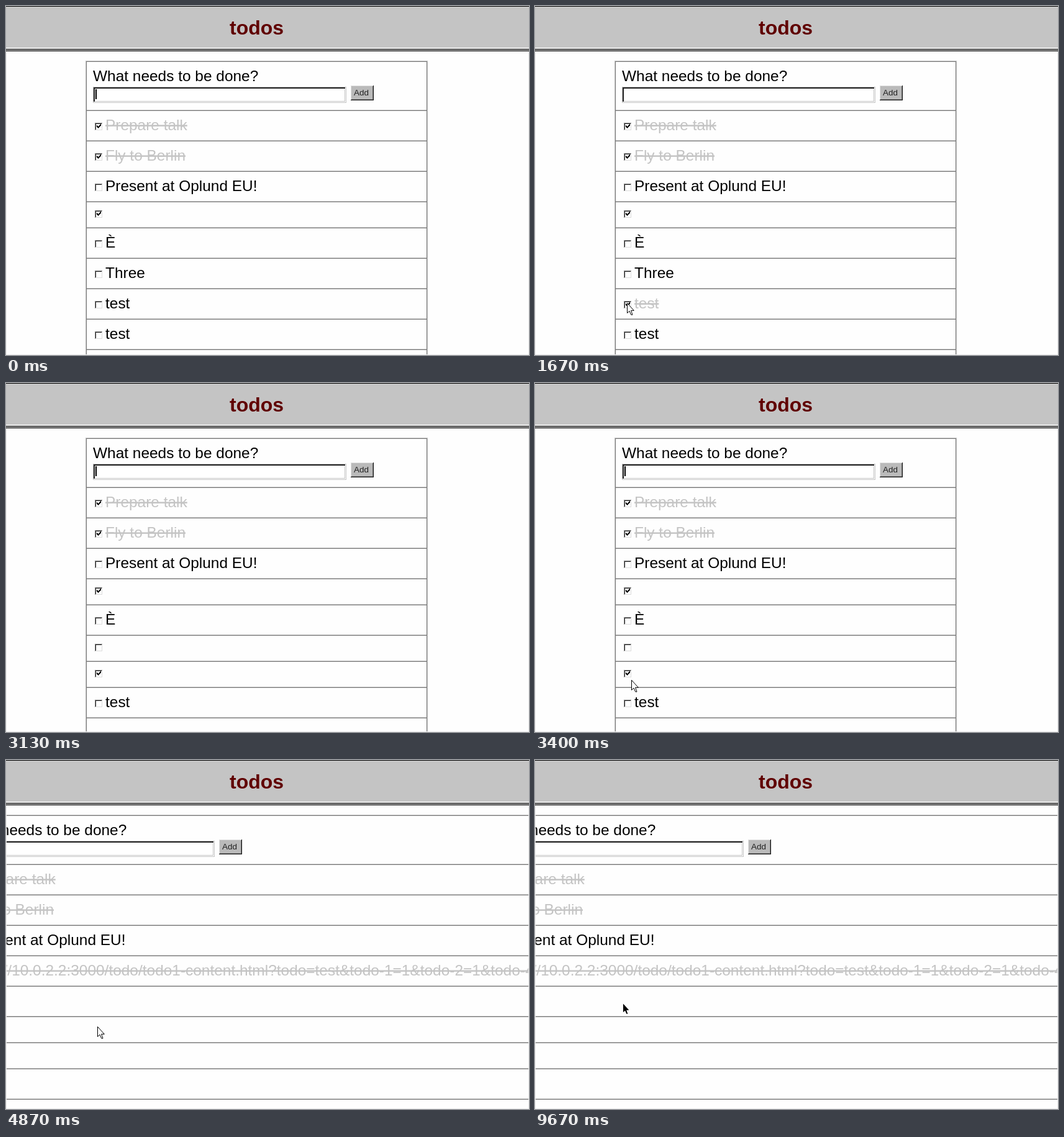
Write an HTML page that moves like this. It is 842 by 562 pixels and loops after 9800 ms.

```html
<!DOCTYPE html>
<html lang="en">
<head>
<meta charset="utf-8">
<title>todos</title>
<style>
html, body { margin: 0; width: 100%; height: 100%; overflow: hidden; background: #fefefe; }
svg { display: block; width: 842px; height: 562px; }
text { font: 24.45px "Liberation Sans", Arial, sans-serif; white-space: pre; }
.done { fill: #c4c4c4; text-decoration: line-through; }
.title { font-size: 32px; font-weight: bold; fill: #600000; }
.button { font-size: 13.5px; fill: #222; }
</style>
</head>
<body>
<svg viewBox="0 0 842 562" shape-rendering="crispEdges">
  <g id="page"></g>
  <g id="frame"></g>
  <g id="pointer"></g>
</svg>
<script>
const TICKS = 147, TICK_RATE = 0.015, SCROLL = 212;
const DARK = '#777', LIGHT = '#c4c4c4';
const $ = id => document.getElementById(id);

const rect = (x, y, w, h, fill) => `<rect x="${x}" y="${y}" width="${w}" height="${h}" fill="${fill}"/>`;
const text = (x, y, s, cls = '') => `<text x="${x}" y="${y}" class="${cls}">${s.replace(/&/g, '&amp;')}</text>`;
const item = (label, checked = false, done = false, height = label ? 49 : 42) => ({ label, checked, done, height });

const head = [
  item('Prepare talk', true, true),
  item('Fly to Berlin', true, true),
  item('Present at Oplund EU!')
];
const url = 'http://10.0.2.2:3000/todo/todo1-content.html?todo=test&todo-1=1&todo-2=1&todo-4=1';
const blank = item(''), ticked = item('', true), accent = item('È'), test = item('test');
const lists = {
  first: [...head, ticked, accent, item('Three'), test, test],
  marked: [...head, ticked, accent, item('Three'), item('test', true, true), test],
  loaded: [...head, ticked, accent, blank, ticked, test],
  cleared: [...head, ticked, accent, blank, blank, test],
  wide: [...head, item(url, true, true), accent, blank, ticked, test]
};

function checkbox(y, checked, pressed) {
  const x = 143;
  return rect(x, y, 12, 12, pressed ? '#b4b4b4' : '#fff') +
    rect(x, y, 12, 1, '#888') + rect(x, y, 1, 12, '#888') +
    rect(x + 1, y + 1, 10, 1, '#222') + rect(x + 1, y + 1, 1, 10, '#222') +
    rect(x + 1, y + 11, 11, 1, '#ddd') + rect(x + 11, y + 1, 1, 11, '#ddd') +
    (checked ? `<path d="M${x + 3} ${y + 4}l2 2 5-4v3l-5 4-2-2z"/>` : '');
}

function form(caret) {
  return rect(140, 130, 408, 26, LIGHT) + rect(141, 131, 406, 24, '#fff') +
    rect(141, 131, 405, 2, '#222') + rect(141, 131, 2, 23, '#222') +
    rect(143, 153, 403, 1, LIGHT) + rect(545, 133, 1, 21, LIGHT) +
    (caret ? rect(144, 134, 2, 16, '#000') : '') +
    rect(555, 128, 37, 24, '#111') + rect(555, 128, 36, 23, '#e4e4e4') +
    rect(556, 129, 35, 22, '#777') + rect(556, 129, 34, 21, '#bababa') +
    text(560, 144, 'Add', 'button');
}

// hidden: half-open range of missing widgets (0 is the form, then the boxes)
function table({ list, count = 9, hidden = [0, 0], caret, pressed, wipe, wide }) {
  const right = wide ? 1500 : 677;
  const shown = n => n < hidden[0] || n >= hidden[1];
  const line = y => rect(130, y - 1, right - 130, 1, LIGHT) + rect(130, y, right - 130, 1, DARK);
  let y = 168;
  let out = text(140, 121, 'What needs to be done?') + line(y) + (shown(0) ? form(caret) : '');
  lists[list].slice(0, count).forEach((row, i) => {
    if (row.label) out += text(160, y + 32, row.label, row.done ? 'done' : '');
    if (shown(i + 1)) out += checkbox(y + (row.label ? 20 : 14), row.checked, pressed === i);
    y += row.height;
    out += line(y);
  });
  const bottom = count < 9 ? y : 562;
  out += rect(128, 88, right - 126, 1, LIGHT) + rect(129, 89, right - 128, 1, DARK) +
    rect(128, 88, 1, bottom - 88, LIGHT) + rect(129, 89, 1, bottom - 89, DARK) +
    rect(right, 89, 1, bottom - 89, DARK) + rect(right + 1, 88, 1, bottom - 88, LIGHT);
  if (wipe) out += rect(129, wipe[0], 550, wipe[1] - wipe[0], '#fefefe');
  return wide ? `<g transform="translate(${-SCROLL})">${out}</g>` : out;
}

// Widgets vanish from the top, then come back in the same order.
const repaint = k => k < 4 ? [0, 2 * k + 2] : [2 * (k - 4), 9];

function page(n) {
  if (n < 16) return { list: 'first', caret: n < 14, pressed: n >= 14 ? 6 : -1 };
  if (n < 20) return { list: 'first', hidden: repaint(n - 16), wipe: [463, 515] };
  if (n < 28) return { list: 'marked', hidden: repaint(n - 16) };
  if (n < 30) return { list: 'marked', hidden: [0, 9] };
  if (n < 43) return null;
  if (n < 47) return { list: 'loaded', count: (n - 42) * 2, hidden: [n - 42, 9] };
  if (n < 58) return { list: 'loaded', caret: n < 56, pressed: n >= 56 ? 6 : -1 };
  if (n < 62) return { list: 'loaded', hidden: repaint(n - 58), wipe: [456, 501] };
  if (n < 67) return { list: 'cleared', hidden: repaint(n - 58) };
  if (n < 69) return { list: 'cleared', hidden: [0, 9] };
  if (n < 70) return null;
  if (n < 73) return { list: 'wide', count: (n - 69) * 2, hidden: [n - 69, 9], wide: n > 71 };
  return { list: 'wide', wide: true };
}

function glide(n, start, end, from, to) {
  const p = Math.min(1, Math.max(0, (n - start) / (end - start)));
  const e = p * p * (3 - 2 * p);
  return from.map((v, i) => Math.round(v + (to[i] - v) * e));
}

function pointerAt(n) {
  if (n >= 1 && n < 16) return glide(n, 1, 13, [554, 552], [148, 478]);
  if (n >= 17 && n < 28) return [148, 478];
  if (n >= 28 && n < 43 && n !== 35) return glide(n, 28, 42, [148, 478], [160, 486]);
  if (n >= 48 && n < 57) return glide(n, 48, 55, [160, 486], [147, 465]);
  if (n >= 58 && n < 126) return glide(n, 67, 73, [147, 465], [147, 429]);
  if (n === 132) return [395, 467];
  if (n === 133) return [386, 310];
  if (n >= 134 && n < 142) return [377, 169];
  if (n === 142) return [377, 438];
  return null;
}

function pointer(n) {
  const arrow = 'M.5.5V16.5L4 13.2 6.7 19.2H9L6.6 12.4H11.3Z';
  if (n >= 145) {
    return `<path transform="translate(141.5 392) scale(.87)" d="${arrow}" stroke="#fff" stroke-width="2.4" shape-rendering="auto" paint-order="stroke"/>`;
  }
  const at = pointerAt(n);
  return at ? `<path transform="translate(${at})" d="${arrow}" fill="#fff" stroke="#000" shape-rendering="auto"/>` : '';
}

$('frame').innerHTML =
  rect(0, 0, 842, 73, '#c4c4c4') + rect(0, 0, 842, 1, '#000') +
  rect(0, 67, 842, 1, '#fff') + rect(0, 69, 842, 2, '#555') + rect(0, 72, 842, 1, '#000') +
  rect(0, 73, 1, 489, '#eee') + rect(841, 73, 1, 489, '#eee') + rect(0, 561, 842, 1, '#eee') +
  text(360, 46, 'todos', 'title');

let last = -1;
function draw(ms) {
  const n = Math.floor((ms + 4) * TICK_RATE) % TICKS;
  if (n === last) return;
  last = n;
  const state = page(n);
  $('page').innerHTML = state ? table(state) : '';
  $('pointer').innerHTML = pointer(n);
}

const start = performance.now();
function loop() {
  draw(performance.now() - start);
  requestAnimationFrame(loop);
}
loop();
</script>
</body>
</html>
```
